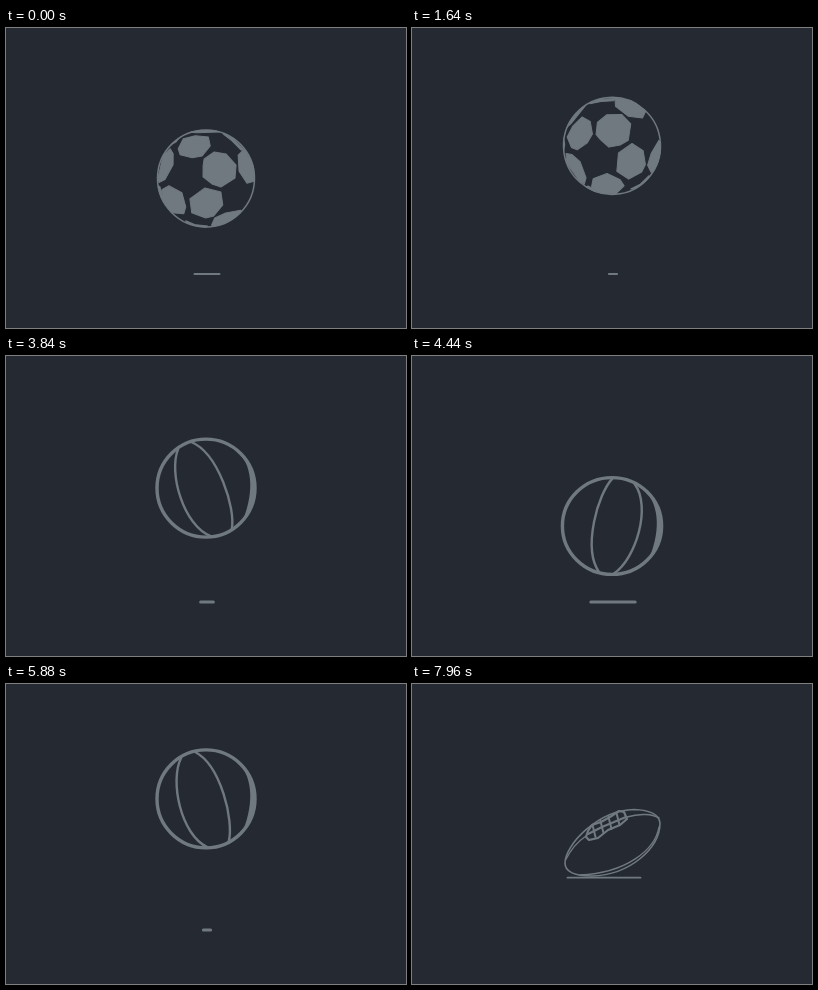
An HTML page with a canvas that plays this animation: 400x300 px, repeating every 8000 ms.

```html
<!DOCTYPE html>
<html lang="en">
<head>
<meta charset="utf-8">
<title>Sports loader</title>
<style>
  html, body { margin: 0; width: 100%; height: 100%; overflow: hidden; background: #252a32; }
  canvas { display: block; width: 400px; height: 300px; }
</style>
</head>
<body>
<canvas id="stage" width="400" height="300"></canvas>
<script>
const ctx = document.getElementById('stage').getContext('2d');
const BG = '#252a32', GREY = '#70797f';
const LOOP = 8000, FLOOR = 247, CX = 200;
const RAD = Math.PI / 180;

function stroke(path, width) {
  ctx.lineWidth = width;
  ctx.stroke(typeof path === 'string' ? new Path2D(path) : path);
}

function ring(r, width) {
  ctx.beginPath();
  ctx.arc(0, 0, r, 0, 2 * Math.PI);
  ctx.lineWidth = width;
  ctx.stroke();
}

function line(x1, y1, x2, y2, width) {
  ctx.beginPath();
  ctx.moveTo(x1, y1);
  ctx.lineTo(x2, y2);
  ctx.lineWidth = width;
  ctx.stroke();
}

// Free fall around an apex, squash around the contact with the floor.
function bounce(dt, half, apex, r, squash, angle, shadowHeight, draw) {
  dt = ((dt + half) % (2 * half) + 2 * half) % (2 * half) - half;
  const drop = (dt / half) ** 2;
  const y = apex + (FLOOR - r - apex) * drop;
  const hit = Math.max(0, 1 - (half - Math.abs(dt)) / 70);
  const sx = 1 + squash * hit, sy = 1 - squash * hit;
  const w = 8 + 82 * drop ** 2.3;
  line(201 - w / 2 + 1, 246, 201 + w / 2 - 1, 246, shadowHeight);
  ctx.save();
  ctx.translate(CX, y + r * (1 - sy));
  ctx.scale(sx, sy);
  draw(angle * RAD);
  ctx.restore();
}

const PATCHES = new Path2D([
  'M172 121L177 111L189 108L202 109L204 118L196 128L186 130L174 127Z',
  'M197 138L198 131L208 124L220 126L230 137L229 150L215 159L206 156L197 149Z',
  'M184 171L199 160L215 164L217 177L208 188L200 190L186 185Z',
  'M152 150L157 128L164 121L167 126L167 137L159 152L153 155Z',
  'M156 162L163 158L176 165L180 179L178 186L166 185L157 173Z',
  'M232 127L238 121L248 138L248 153L241 155L233 143Z',
  'M206 197L209 190L220 185L235 182L234 186L222 195L207 199Z',
  'M180 104L190 102L212 103L213 104L190 105Z',
  'M217 106L226 110L237 121L235 122L226 113Z',
  'M152 158L154 159L158 176L154 172Z',
  'M165 117L172 109L176 106L170 114Z',
  'M180 193L190 197L202 198L200 200L184 197Z'
].join(''));

function soccer(angle) {
  ctx.rotate(angle);
  ctx.beginPath();
  ctx.arc(0, 0, 49, 0, 2 * Math.PI);
  ctx.save();
  ctx.clip();
  ctx.translate(-CX, -150.5);
  ctx.fill(PATCHES);
  stroke(PATCHES, 1);
  ctx.restore();
  ring(48.5, 1.5);
}

function basketball(angle) {
  ring(49, 3.4);
  ctx.fill(new Path2D('M30 -39C46 -24 49 2 37 32A49 49 0 0 0 30 -39Z'));
  ctx.rotate(angle);
  stroke('M-15 -46C12 -35 30 20 26 41', 2.4);
  stroke('M-28 -39C-38 -15 -22 38 5 48', 2.4);
}

function puck(t) {
  ctx.beginPath();
  ctx.ellipse(200, 141, 43.5, 6.5, 0, 0, 2 * Math.PI);
  ctx.lineWidth = 1;
  ctx.stroke();
  stroke('M157 139.5L155.5 143V174C157 183.5 243 183.5 244.5 174V143L243 139.5', 1.2);
  stroke('M155.5 143C158 151.5 242 151.5 244.5 143', 1.1);
  stroke('M157 174.5C164 181.5 236 181.5 243 174.5', 0.9);

  const word = 'WELCOME';
  const turn = -86 - 0.304 * (t - 2600);
  ctx.font = '300 17px Roboto, "Open Sans", sans-serif';
  ctx.textAlign = 'center';
  ctx.textBaseline = 'alphabetic';
  for (let i = 0; i < word.length; i++) {
    const a = (turn + (i - 3) * 13.2) * RAD, face = Math.cos(a);
    if (face <= 0.04) continue;
    ctx.save();
    ctx.translate(200 + 44 * Math.sin(a), 164 + 5.5 * face);
    ctx.transform(face * 0.75, -Math.sin(a) * 0.1, 0, 1, 0, 0);
    ctx.fillText(word[i], 0, 0);
    ctx.restore();
  }
}

// Closed seam curve on a unit sphere, widened and seen from the side of one lobe.
function seam(u, yaw) {
  const k = 0.44;
  const a = Math.PI / 2 - (Math.PI / 2 - k) * Math.cos(u);
  const b = u / 2 + k * Math.sin(2 * u);
  const x = Math.cos(a), y = 1.5 * Math.sin(a) * Math.cos(b), z = Math.sin(a) * Math.sin(b);
  const len = Math.hypot(x, y, z);
  const c = Math.cos(yaw), s = Math.sin(yaw);
  return [(x * c + z * s) / len, y / len, (z * c - x * s) / len];
}

function baseball(t) {
  const R = 33, N = 120, yaw = (8 - 0.2286 * (t - 6920)) * RAD;
  ctx.save();
  ctx.translate(200.3, 150);
  ring(R, 2.2);
  ctx.beginPath();
  ctx.arc(0, 0, R + 1, 0, 2 * Math.PI);
  ctx.clip();
  for (let i = 0; i < N; i++) {
    const u = i / N * 4 * Math.PI;
    const p = seam(u, yaw), q = seam(u + 4 * Math.PI / N, yaw);
    if (p[2] < -0.04) continue;
    line(p[0] * R, p[1] * R, q[0] * R, q[1] * R, 1.5);
    const d = q.map((v, j) => v - p[j]);
    const len = Math.hypot(...d);
    const [tx, ty, tz] = d.map(v => v / len);
    const nx = p[1] * tz - p[2] * ty, ny = p[2] * tx - p[0] * tz;
    const tick = (out, back, width) => line(p[0] * R, p[1] * R,
      (p[0] + nx * out - tx * back) * R, (p[1] + ny * out - ty * back) * R, width);
    tick(0.13, 0.05, 1.1);
    tick(-0.28, 0.1, 1.5);
  }
  ctx.restore();
}

function football(t) {
  const q = Math.min(1, (t - 7590) / 370);
  const tilt = 84 - 55.5 * q;
  const h = Math.hypot(53 * Math.sin(tilt * RAD), 25 * Math.cos(tilt * RAD));
  const w = 40 + 33 * q;
  line(192 - w / 2, 193.7, 192 + w / 2, 193.7, 1.8);
  ctx.save();
  ctx.translate(200, 192 - h);
  ctx.rotate((28.5 - tilt) * RAD);
  ctx.translate(-200, -158.5);
  stroke('M153 179C153 161 186 126 222 125.5C237 126 247 130 248 139' +
    'C248 164 218 191 180 192C165 192 153 189 153 179Z', 1.6);
  stroke('M247 143C243 166 214 189 168 191', 1.4);
  stroke('M153.5 176C158 167 165 158 174 152M215 133C228 129 240 130 247 134', 1.5);
  stroke('M174 153L176 147L180 141L189 138L198 133L207 127L212 128L215 135L208 141L196 146L186 154L177 156Z', 2.2);
  stroke('M176 150L190 143L214 133', 2);
  for (let i = 0; i < 4; i++) {
    const x = 182 + i * 8, y = 147 - i * 4;
    line(x - 1.5, y - 6, x + 1.5, y + 6, 2);
  }
  ctx.restore();
}

function basketballScene(t) {
  const late = t >= 4925;
  const angle = 0.355 * (t - 3840);
  bounce(t - (late ? 4925 : 4085), late ? 398 : 420, 99, 50, 0.14, angle, 3, basketball);
}

const SCENES = [
  [1760, t => bounce(t + 319, 440, 97, 49, 0.1, t / 880 * 360, 2, soccer)],
  [2943, puck],
  [6005, basketballScene],
  [7590, baseball],
  [LOOP, football]
];

function draw(t) {
  ctx.fillStyle = BG;
  ctx.fillRect(0, 0, 400, 300);
  ctx.fillStyle = ctx.strokeStyle = GREY;
  ctx.lineCap = ctx.lineJoin = 'round';
  SCENES.find(([end]) => t < end)[1](t);
}

const start = performance.now();
function tick() {
  draw((performance.now() - start) % LOOP);
  requestAnimationFrame(tick);
}
tick();
</script>
</body>
</html>
```
